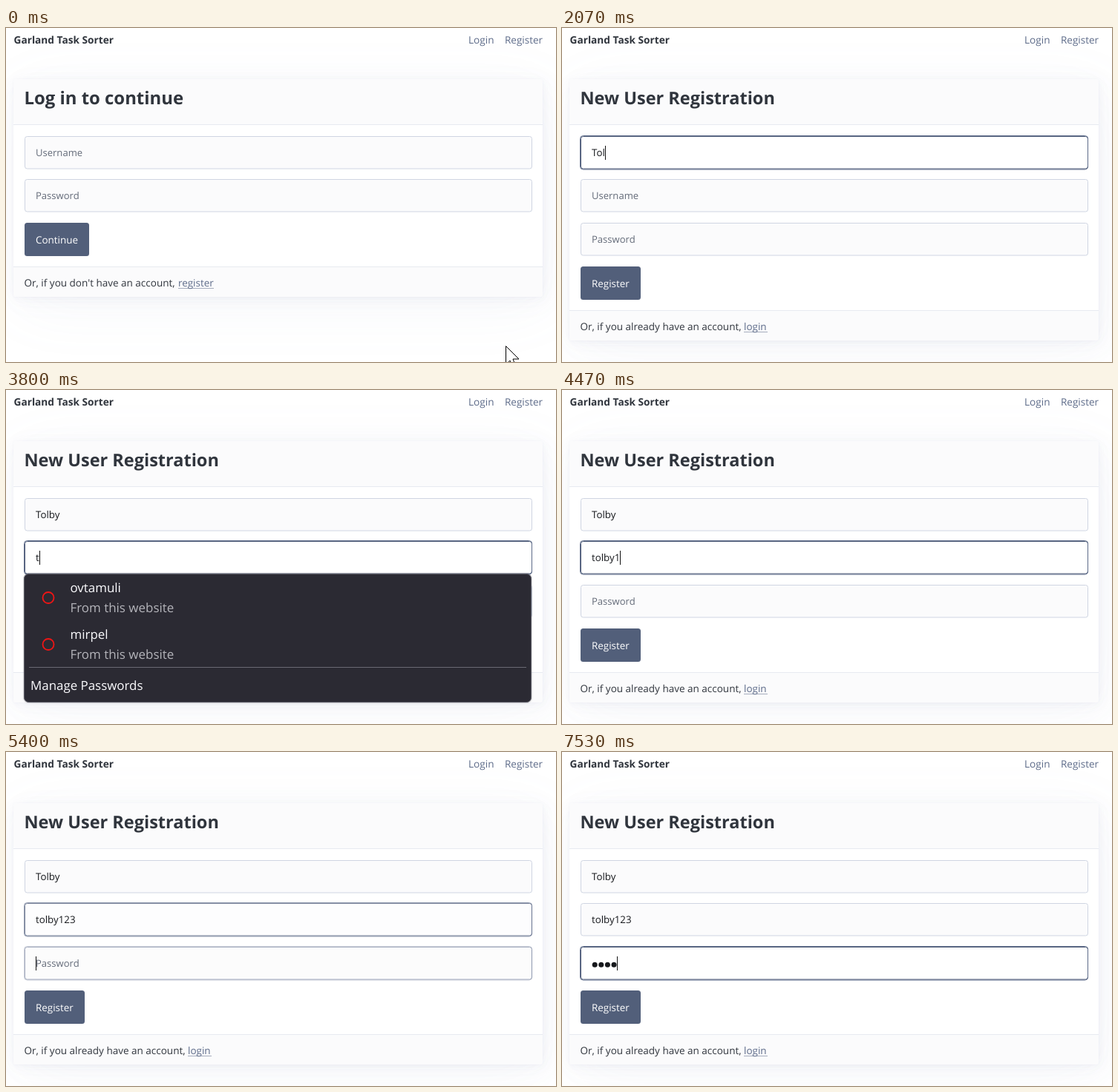
Recreate the animation shown at these times as an HTML page. Size 741x451 px, loop 8 s.

```html
<!DOCTYPE html>
<html lang="en">
<head>
<meta charset="utf-8">
<title>Registration form</title>
<style>
  html, body { margin: 0; width: 100%; height: 100%; overflow: hidden; background: #fff; }
  #card {
    --s: 129, 145, 181;
    position: absolute; left: 10px; top: 69px; width: 713px; border-radius: 3.5px; background: #fff;
    box-shadow: .2px .4px 2.5px rgba(var(--s), .017), .5px 1px 6px rgba(var(--s), .024),
      .9px 1.8px 11px rgba(var(--s), .03), 1.6px 3.3px 20px rgba(var(--s), .036),
      3px 6px 36.5px rgba(var(--s), .043), 7.3px 14.6px 88px rgba(var(--s), .06),
      0 0 0 1px rgba(var(--s), .015);
  }
  svg { position: absolute; left: 0; top: 0; }
  text { font-family: "Open Sans", "Noto Sans", sans-serif; text-rendering: geometricPrecision; white-space: pre; }
  .popup { filter: drop-shadow(0 0 1px rgba(0, 0, 0, .35)); }
</style>
</head>
<body>
<div id="card"></div>
<svg id="view" width="741" height="451" viewBox="0 0 741 451"></svg>
<script>
const LOOP = 8000, BLINK = 535, FADE = 200;
const LOADED = 870;
const FOCUS = [1470, 2600, 5325];
const KEYS = [
  [1870, 1970, 2070, 2170, 2270],
  [3800, 3930, 4130, 4270, 4330, 4470, 4670, 4735],
  [7200, 7270, 7330, 7530]
];
const VALUES = ["Tolby", "tolby123", "••••"];
const HINTS = ["Your name", "Username", "Password"];
const INK = "#16181c", HEADING = "#30353d", LINK = "#5d6b89", ACCENT = "#525f7a", TINT = "#fbfbfc";
const FIELD_Y = [146, 204, 263];

const card = document.getElementById("card");
const view = document.getElementById("view");
const pen = document.createElement("canvas").getContext("2d");

const clamp = v => Math.max(0, Math.min(1, v));
const ease = v => { v = clamp(v); return v * v * (3 - 2 * v); };
const lerp = (a, b, k) => a + (b - a) * k;
const during = (t, a, b) => t >= a && t < b;

const text = (x, y, str, size, fill, weight = 400) =>
  `<text x="${x}" y="${y}" font-size="${size}" font-weight="${weight}" fill="${fill}">${str}</text>`;
const rect = (x, y, w, h, fill, extra = "") =>
  `<rect x="${x}" y="${y}" width="${w}" height="${h}" fill="${fill}" ${extra}/>`;

function textWidth(str, size) {
  pen.font = `${size}px "Open Sans", "Noto Sans", sans-serif`;
  return pen.measureText(str).width;
}

// k is the strength of the focus style, from 0 to 1
function field(y, hint, value = "", k = 0, caret = false) {
  const secret = value[0] === "•";
  const box = (grow, fill, extra) =>
    rect(25.5 - grow, y + .5 - grow, 683 + grow, 43.5 + 2 * grow, fill, `rx="${3 + grow}" ${extra}`);
  let out = box(0, TINT, 'stroke="#cfd5e2"') +
    box(0, "#fff", `stroke="${ACCENT}" opacity="${k}"`) +
    box(1, "none", `stroke="${LINK}" opacity="${k}"`);
  if (secret) {
    for (let i = 0; i < value.length; i++)
      out += `<circle cx="${44.2 + 8.6 * i}" cy="${y + 24.3}" r="3.5" fill="${INK}"/>`;
  } else {
    out += text(40, y + 27, value || hint, value ? 13.3 : 13.05, value ? INK : "#646b79");
  }
  if (caret) {
    const w = secret ? 8.6 * value.length : textWidth(value, 13.3);
    out += rect(Math.round(40 + w), y + 13, 1, 19, "#111");
  }
  return out;
}

function button(y, label, w) {
  return rect(25, y, w, 45, ACCENT, 'rx="3.5"') + text(40, y + 28, label, 13.45, "#fff");
}

function footer(y, label, link, x, w, hover) {
  const color = hover ? "#48536b" : LINK;
  return rect(10, y, 713, 41, TINT, 'rx="3"') + rect(10, y, 713, 1, "#e7eaf0") +
    text(24.5, y + 27, label, 13.5, "#30353d") + text(x, y + 27, link, 13.45, color) +
    rect(x, y + 29, w, 1, color, `opacity="${hover ? 1 : .55}"`);
}

function popup(y, h, body, opacity = 1) {
  return `<g class="popup" opacity="${opacity}">` +
    rect(24.5, y + .5, 683, h - 1, "#2b2a33", 'rx="6" stroke="#5b5b66"') + body + "</g>";
}

function logins(y) {
  return ["ovtamuli", "mirpel"].map((name, i) => {
    const top = y + 63 * i;
    return `<circle cx="57" cy="${top + 32.5}" r="7.5" fill="none" stroke="#f01515" stroke-width="1.8"/>` +
      text(86.5, top + 25, name, 16.9, "#fbfbfe") +
      text(86.5, top + 52, "From this website", 16.95, "#b4b4ba");
  }).join("");
}

const manage = y => text(33, y, "Manage Passwords", 16.9, "#fbfbfe");

function popups(t) {
  if (during(t, 2400, 2600)) return popup(190, 42, text(33, 217, VALUES[0], 16.9, "#fbfbfe"));
  if (during(t, 2790, 3930))
    return popup(248, 174, logins(248) + rect(31, 374, 670, 1, "#6a6a74") + manage(405));
  if (during(t, 4735, 5270)) return popup(248, 48.5, manage(279), lerp(.5, 1, clamp((t - 4735) / 130)));
  if (during(t, 5500, 7200))
    return popup(308, 240, logins(308) + text(86.5, 460, "Use a Securely Generated Password", 16.9, "#fbfbfe"));
  return "";
}

const SHAPES = {
  arrow: '<path d="M.5 .5V25.5L6 20L9.5 28.5L13.5 27L10 18H18Z" fill="#fff" stroke="#000"/>',
  hand: '<path d="M-2 1Q0-2 2 1V9L5 9.5L8 10.5L11 12Q13 13 12.5 16L10.5 24H-3L-9 15Q-10 11-6 12L-2 15Z" fill="#fff" stroke="#000" stroke-width="1.2"/>',
  beam: '<path d="M-7-12H-3Q0-12 0-10Q0-12 3-12H6M0-10V10M-7 12H-3Q0 12 0 10Q0 12 3 12H6" fill="none" stroke="#000" stroke-width="2"/>'
};

function pointer(t) {
  if (t >= KEYS[0][0]) return "";
  const away = ease((t - 30) / 690), back = ease((t - LOADED) / 460);
  const x = lerp(lerp(673, 256, away), 183, back);
  const y = lerp(lerp(429, 342, away), 168, back);
  let shape = "arrow";
  if (t < LOADED) {
    if (x < 280 && y < 353) shape = "hand";
  } else if (FIELD_Y.some(top => y >= top && y <= top + 45)) shape = "beam";
  return `<g transform="translate(${x.toFixed(1)} ${y.toFixed(1)})">${SHAPES[shape]}</g>`;
}

function loginForm(t) {
  return text(24.5, 103, "Log in to continue", 23.9, HEADING, 700) +
    field(146, "Username") + field(204, "Password") + button(263, "Continue", 87) +
    footer(322, "Or, if you don't have an account,", "register", 232, 48, t > 640);
}

function registerForm(t) {
  const active = FOCUS.filter(f => t >= f).length - 1;
  const lastEvent = Math.max(...[...FOCUS, ...KEYS.flat()].filter(e => e <= t));
  const caretOn = Math.floor((t - lastEvent) / BLINK) % 2 === 0;
  const fields = HINTS.map((hint, i) => {
    const value = VALUES[i].slice(0, KEYS[i].filter(k => t >= k).length);
    const left = i < 2 ? ease((t - FOCUS[i + 1]) / FADE) : 0;
    const k = ease((t - FOCUS[i]) / FADE) - left;
    return field(FIELD_Y[i], hint, value, k, i === active && caretOn);
  });
  return text(24.5, 103, "New User Registration", 23.5, HEADING, 700) + fields.join("") +
    button(322, "Register", 81) +
    footer(381, "Or, if you already have an account,", "login", 245, 32, false);
}

function draw(t) {
  const loaded = t >= LOADED;
  card.style.height = (loaded ? 353 : 294) + "px";
  view.innerHTML =
    text(10.5, 21, "Garland Task Sorter", 13.7, HEADING, 700) +
    text(623, 21, "Login", 13.6, LINK) + text(672, 21, "Register", 13.5, LINK) +
    rect(10, 69, 713, 61, TINT, 'rx="3"') + rect(10, 130, 713, 1, "#e7eaf0") +
    (loaded ? registerForm(t) : loginForm(t)) + popups(t) + pointer(t);
}

const start = performance.now();
function tick() {
  draw((performance.now() - start) % LOOP);
  requestAnimationFrame(tick);
}
tick();
</script>
</body>
</html>
```
